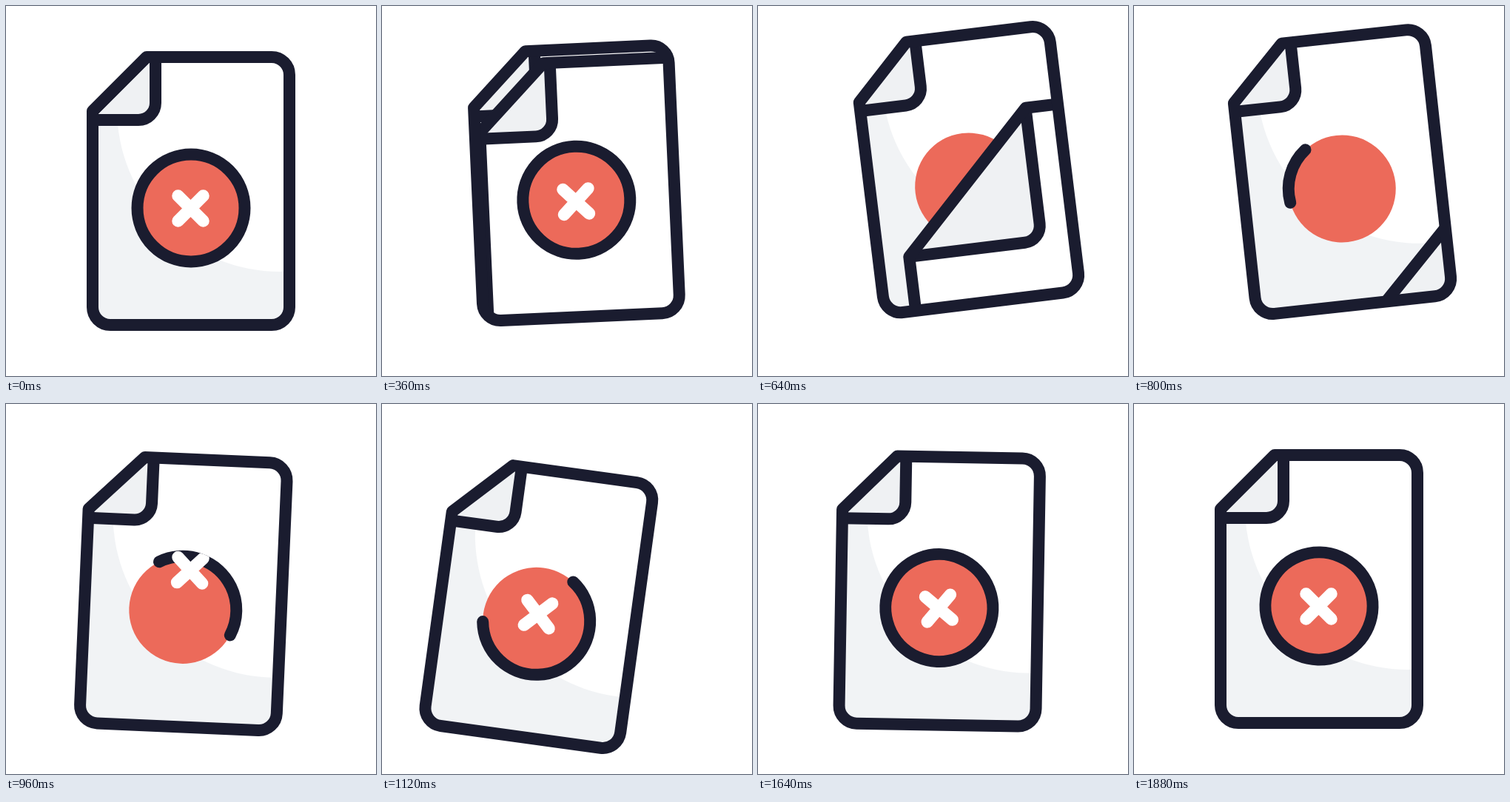
An HTML page for the animation above (2 s loop, 500x500 px).

```html
<!DOCTYPE html>
<html lang="en">
<head>
<meta charset="utf-8">
<title>Rejected document</title>
<style>
  html, body { margin: 0; width: 100%; height: 100%; overflow: hidden; background: #fff; }
  svg { display: block; width: 100vw; height: 100vh; }
  .line { fill: none; stroke: #1a1c2f; stroke-width: 16; stroke-linejoin: round; }
  .paper { fill: #fff; }
  .shade { fill: #f1f3f5; }
  .flap { fill: #eff1f3; }
  .disk { fill: #ec6a5a; }
</style>
</head>
<body>
<svg viewBox="0 0 500 500">
  <defs>
    <clipPath id="sheetClip"><path class="sheet"/></clipPath>
    <clipPath id="frontClip"><path id="frontArea"/></clipPath>
    <clipPath id="diskClip"><circle cx="250" cy="273" r="80.5"/></clipPath>
  </defs>
  <g id="page">
    <path class="sheet shade"/>
    <g clip-path="url(#sheetClip)">
      <circle class="paper" cx="370" cy="139" r="220"/>
    </g>
    <circle class="disk" cx="250" cy="273" r="72.5"/>
    <circle id="ring" class="line" cx="250" cy="273" r="72.5" pathLength="360" stroke-linecap="round"/>
    <path id="backFlap" class="flap"/>
    <path id="backFold" class="line"/>

    <g id="front" clip-path="url(#sheetClip)">
      <g clip-path="url(#frontClip)">
        <path class="sheet shade"/>
        <circle id="glow" class="paper" cx="370" cy="139"/>
        <circle class="disk" cx="250" cy="273" r="72.5"/>
        <circle class="line" cx="250" cy="273" r="72.5"/>
      </g>
    </g>
    <g clip-path="url(#diskClip)">
      <path id="cross" d="M-17-17 17 17M17-17-17 17" fill="none" stroke="#fff" stroke-width="16.5" stroke-linecap="round"/>
    </g>
    <g id="peel" clip-path="url(#sheetClip)">
      <path id="frontFlap" class="flap"/>
      <path id="frontFold" class="line"/>
      <path id="frontEdge" class="line"/>
    </g>
    <path class="sheet line"/>
  </g>
</svg>
<script>
const LOOP = 2000, STEP = 40;
const CUT = 259, PEEL_LENGTH = 591;
const LEFT_LEAN = { x: 32, y: -29, turn: -7 };
const RIGHT_LEAN = { x: -39, y: 21, turn: 8 };

const $ = id => document.getElementById(id);
const set = (id, attrs) => {
  for (const name in attrs) $(id).setAttribute(name, attrs[name]);
};
const show = (id, on) => set(id, { visibility: on ? 'visible' : 'hidden' });

const span = (t, start, end) => Math.min(1, Math.max(0, (t - start) / (end - start)));
const easeIn = (u, power = 2) => u ** power;
const easeOut = (u, power = 2) => 1 - (1 - u) ** power;
const easeInOut = u => u < 0.5 ? 4 * u ** 3 : 1 - 4 * (1 - u) ** 3;

// Corner fold of a sheet whose cut has travelled some distance along its diagonal.
function fold(travel) {
  const cut = CUT + travel;
  const left = 117 + travel * 0.162, top = 69 + travel * 0.42;
  const slack = Math.max(0, 12 - travel / 12);
  const fx = cut - top + slack, fy = cut - left + slack;
  const diagonal = `${left} ${cut - left}L${cut - top} ${top}`;
  const crease = `${fx} ${top}V${fy - 23}a23 23 0 0 1-23 23H${left}`;
  return {
    crease: 'M' + crease,
    flap: `M${diagonal}L${crease}Z`,
    edge: `M${left} 900L${diagonal}H900`,
    area: `M${diagonal}H900V900H${left}Z`
  };
}

function drawPage(t) {
  const rise = easeInOut(span(t, 80, 700));
  const swing = easeInOut(span(t, 680, 1190));
  const settle = easeInOut(span(t, 1200, 1840));
  const bow = 3 * Math.sin(Math.PI * swing);
  const lean = key =>
    LEFT_LEAN[key] * (rise - swing) + RIGHT_LEAN[key] * (swing - settle);
  set('page', {
    transform: `translate(${lean('x') + bow} ${lean('y') + bow}) rotate(${lean('turn')} 250 250)`
  });
}

function drawPeel(t) {
  const u = span(t, 175, 880);
  const front = fold(PEEL_LENGTH * easeIn(u));
  set('frontArea', { d: front.area });
  set('frontFlap', { d: front.flap });
  set('frontFold', { d: front.crease });
  set('frontEdge', { d: front.edge });
  set('glow', { r: 220 + 220 * easeInOut(span(t, 80, 480)) });
  show('front', u < 1);
  show('peel', u < 1);
}

function drawRing(t) {
  const u = span(t, 680, 1380);
  set('ring', {
    'stroke-dasharray': u < 1 ? `${360 * u} 360` : 'none',
    transform: `rotate(${115 + 268 * easeOut(u, 1.25)} 250 273)`
  });
  show('ring', u > 0);
}

// The cross drops out of the disk, falls back in from above and wobbles to rest.
function drawCross(t) {
  const drop = t < 740
    ? 125 * easeIn(span(t, 320, 700))
    : 160 * (easeOut(span(t, 760, 1240)) - 1);
  const u = span(t, 1220, 1880);
  const turn = 15.6 * (1 - u) * Math.sin(2.36 * Math.PI * u);
  set('cross', {
    transform: `translate(${249.5 - drop * 0.15} ${273.5 + drop}) rotate(${turn})`
  });
}

const corner = fold(0);
set('backFlap', { d: corner.flap });
set('backFold', { d: corner.crease });
for (const el of document.querySelectorAll('.sheet')) {
  el.setAttribute('d', 'M117 142L190 69H359a24 24 0 0 1 24 24V407a24 24 0 0 1-24 24H141a24 24 0 0 1-24-24Z');
}

const begin = performance.now();
function tick() {
  const elapsed = (performance.now() - begin) % LOOP;
  const t = Math.floor(elapsed / STEP) * STEP;
  for (const draw of [drawPage, drawPeel, drawRing, drawCross]) draw(t);
  requestAnimationFrame(tick);
}
tick();
</script>
</body>
</html>
```
